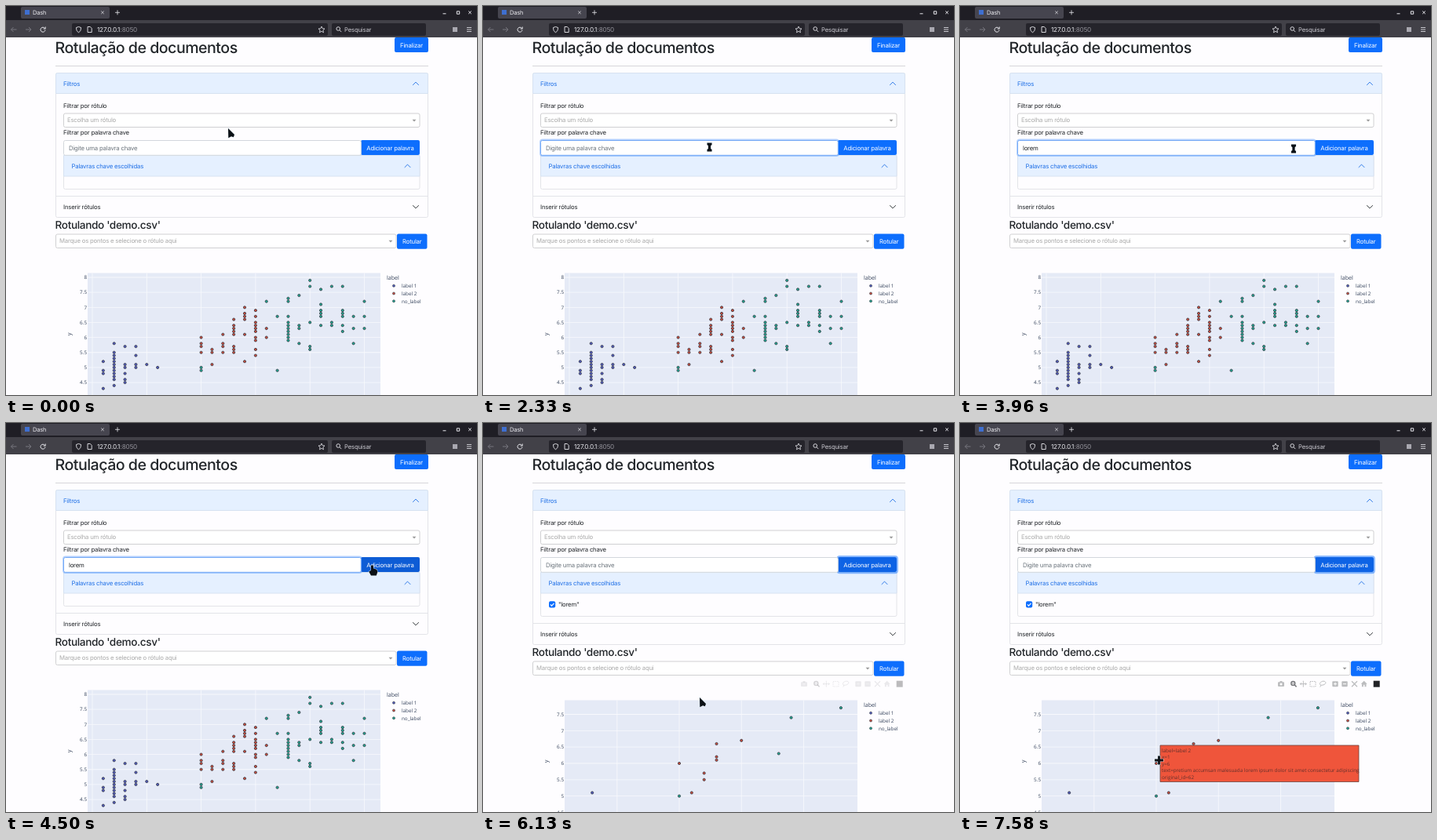
Write an HTML page with a canvas that moves like this. It is 600 px wide and 496 px high and loops after 8 s.

```html
<!DOCTYPE html>
<html lang="pt">
<head>
<meta charset="utf-8">
<title>Rotulação de documentos</title>
<style>
html, body { margin: 0; width: 100%; height: 100%; overflow: hidden; background: #fff; }
canvas { display: block; }
</style>
</head>
<body>
<canvas id="stage" width="600" height="496"></canvas>
<script>
const LOOP = 8000, FOCUS = 1750, PRESS = 4540, RESULT = 4670, HINT = 6960;
const LETTERS = [2580, 2750, 2850, 2960, 3070];
const BLUE = '#0d6efd', INK = '#212529', LINE = '#e3e4e8', PALE = '#e5f0ff';
const ctx = document.getElementById('stage').getContext('2d');

// Scatter values in tenths: {x: [y, ...]} for each label
const span = (a, b) => Array.from({ length: b - a + 1 }, (_, i) => a + i);
const allPoints = [
  { 1: [43, 48, 49, 52], 2: [44, ...span(46, 55), 58], 3: [45, 46, 48, 50, 51, 57],
    4: [50, 51, 54, 57], 5: [51], 6: [50] },
  { 10: [55, 57, 58, 60], 11: [51, 55, 56], 12: [55, 57, 58, 61],
    13: [...span(55, 57), ...span(61, 64), 66], 14: [52, 61, 66, 67, 68, 70],
    15: [54, 56, 59, 60, ...span(62, 65), 67, 69], 16: [60, 63] },
  { 10: [49, 50], 16: [72], 17: [49, 67], 18: [...span(59, 65), 67, 72, 73],
    19: [58, 63, 64, 74], 20: [56, 57, 65, 77, 79], 21: [64, 67, 68, 69, 71, 76],
    22: [64, 65, 77], 23: [62, 64, 67, 68, 69, 77], 24: [58, 63, 67], 25: [63, 67, 72] }
];
const loremPoints = [
  { 3: [51] },
  { 10: [60], 11: [51], 12: [55, 57], 13: [61, 62, 66], 15: [67] },
  { 10: [50], 18: [63], 19: [74], 23: [77] }
];
const views = {
  all: { points: allPoints, x: v => 110 + v * 13.86, y: v => 346 + (80 - v) * 3.83 },
  lorem: { points: loremPoints, x: v => 91.6 + v * 15.84, y: v => 371.5 + (75 - v) * 4.165 }
};
const labels = [['label 1', '#525cc4'], ['label 2', '#cf4c3c'], ['no_label', '#1fab94']];

const clamp = v => Math.max(0, Math.min(1, v));
const ramp = (t, start, length) => clamp((t - start) / length);
const smooth = p => p * p * (3 - 2 * p);

function text(str, x, cy, { size = 7.75, color = INK, weight = 400, font = 'Inter', align = 'left' } = {}) {
  ctx.font = `${weight} ${size}px "${font}", sans-serif`;
  ctx.letterSpacing = font === 'Inter' ? `${-0.026 * size}px` : '0px';
  ctx.textRendering = 'geometricPrecision';
  ctx.textAlign = align;
  ctx.fillStyle = color;
  ctx.fillText(str, x, cy + size * 0.36);
}

function box(x, y, x2, y2, fill, stroke, r = 2, width = 1) {
  ctx.beginPath();
  ctx.roundRect(x, y, x2 - x, y2 - y, r);
  if (fill) { ctx.fillStyle = fill; ctx.fill(); }
  if (stroke) { ctx.strokeStyle = stroke; ctx.lineWidth = width; ctx.stroke(); }
}

function path(d, x, y, color, width = 1, fill) {
  const p = new Path2D(d);
  ctx.save();
  ctx.translate(x, y);
  if (fill) { ctx.fillStyle = fill; ctx.fill(p); }
  if (color) { ctx.strokeStyle = color; ctx.lineWidth = width; ctx.stroke(p); }
  ctx.restore();
}

function circle(x, y, r, fill, stroke, width) {
  ctx.beginPath();
  ctx.arc(x, y, r, 0, 7);
  if (fill) { ctx.fillStyle = fill; ctx.fill(); }
  if (stroke) { ctx.strokeStyle = stroke; ctx.lineWidth = width; ctx.stroke(); }
}

const chevron = (x, y, color, dir) => path(`M-3.8 ${-1.9 * dir}L0 ${1.9 * dir}L3.8 ${-1.9 * dir}`, x, y, color, 0.9);

function browser() {
  const pale = '#e9e9ee', dim = '#77767e', field = '#25242b';
  box(0, 0, 600, 18, '#1f1e25', null, 0);
  box(0, 18, 600, 40, '#424148', null, 0);
  box(19, 1, 132, 16, '#46454f');
  box(24, 5, 30, 11, '#3f6fd0', null, 0);
  text('Dash', 34, 8.3, { color: pale, size: 7.5 });
  path('M-1.8-1.8L1.8 1.8M1.8-1.8L-1.8 1.8', 123, 8.3, pale, 0.7);
  path('M-3 0H3M0-3V3', 142, 8.3, pale, 0.8);
  path('M-2 1.5H2', 558.5, 8.3, pale, 1);
  box(574.3, 6.8, 577.7, 10.2, null, pale, 0, 1);
  path('M-1.8-1.8L1.8 1.8M1.8-1.8L-1.8 1.8', 591, 8.3, pale, 1);
  path('M3.5 0H-3.5M-.5-3L-3.5 0L-.5 3', 10, 30, dim);
  path('M-3.5 0H3.5M.5-3L3.5 0L.5 3', 28.5, 30, dim);
  path('M2.5-1.5A3 3 0 1 0 3 .5M3.2-3.5V-1H.7', 47, 30, pale);
  box(84, 22, 410, 38, field);
  box(415, 22, 535, 38, field);
  path('M0-3.5L3-2.5C3 1 2 2.5 0 3.7C-2 2.5-3 1-3-2.5Z', 92.5, 30, pale, 0.9);
  path('M-2.5-3.5H.8L2.7-1.5V3.5H-2.5Z', 106.5, 30, pale, 0.9);
  text('127.0.0.1', 116, 30, { color: pale, size: 8.2 });
  text(':8050', 145.5, 30, { color: '#929199', size: 8.2 });
  path('M0-4L1.2-1.3L4-1L1.9 .9L2.5 3.8L0 2.3L-2.5 3.8L-1.9 .9L-4-1L-1.2-1.3Z', 402, 30, pale, 0.8);
  circle(423.2, 29, 2.3, null, pale, 0.9);
  path('M0 0L2.3 2.3', 425, 30.8, pale, 0.9);
  text('Pesquisar', 431, 30, { color: '#c9c8cf' });
  box(569, 27, 575, 33, '#a9a8b0', null, 0);
  path('M-3-2.5H3M-3 0H3M-3 2.5H3', 590, 30, pale, 0.8);
}

function select(x, y, x2, placeholder) {
  box(x + 0.5, y + 0.5, x2 - 0.5, y + 18, '#fff', '#d0d0d2');
  text(placeholder, x + 5, y + 9, { color: '#aaa' });
  path('M-2.4-1.2H2.4L0 1.4Z', x2 - 7.5, y + 9.5, null, 1, '#999');
}

function button(label, x, y, x2, y2, color = BLUE) {
  box(x, y, x2, y2, color);
  text(label, (x + x2) / 2, (y + y2) / 2 + 0.3, { color: '#fff', align: 'center' });
}

function keywordRow(t) {
  const hover = ramp(t, 4090, 150) * (1 - ramp(t, 5560, 150) * 0.4);
  const focus = t < PRESS ? ramp(t, FOCUS, 150) : 1 - ramp(t, PRESS, 150);
  const pressed = ramp(t, PRESS, 150);
  if (pressed) box(451.5, 170, 527.8, 191.2, null, `rgba(49,132,253,${0.55 * pressed})`, 3, 2.2);
  button('Adicionar palavra', 452, 171, 527, 190, `rgb(13,${110 - 18 * hover},${253 - 40 * hover})`);
  if (focus) box(73, 170.5, 453, 191, null, `rgba(13,110,253,${0.3 * focus})`, 3, 2);
  box(73.5, 171.5, 452.3, 190.3, '#fff', focus > 0.3 ? '#76aaf5' : '#d3d7dc');
  const typed = t < RESULT ? 'lorem'.slice(0, LETTERS.filter(at => t >= at).length) : '';
  text(typed || 'Digite uma palavra chave', 80, 181, { color: typed ? INK : '#6c757d' });
}

function page(t, shift) {
  box(0, 40, 600, 496, '#fefdff', null, 0);
  text('Rotulação de documentos', 62.5, 53, { size: 19.6, weight: 500 });
  button('Finalizar', 495, 40, 538, 59);
  box(63, 76, 538, 77, '#d6d6d9', null, 0);

  box(63.5, 85.5, 537.5, 269.5 + shift, '#fefdff', LINE);
  box(63.5, 85.5, 537.5, 111.5, PALE, '#d6e2f1', [2, 2, 0, 0]);
  text('Filtros', 73, 99.3, { color: '#1f6fe6' });
  chevron(522, 99, '#1f6fe6', -1);
  text('Filtrar por rótulo', 73, 127);
  select(73, 136.5, 527.5, 'Escolha um rótulo');
  text('Filtrar por palavra chave', 73, 161);

  box(73.5, 190.5, 527, 233.5 + shift, '#fefdff', LINE);
  box(73.5, 190.5, 527, 217, PALE, '#d6e2f1', 0);
  text('Palavras chave escolhidas', 83.5, 204.3, { color: '#1f6fe6' });
  chevron(511.5, 204, '#1f6fe6', -1);
  keywordRow(t);
  if (shift) {
    box(84, 227.3, 92.2, 235.5, BLUE);
    path('M-2.2 0L-.6 1.7L2.4-1.6', 88.1, 231.4, '#fff', 1.2);
    text('"lorem"', 96, 231.5);
  }

  ctx.save();
  ctx.translate(0, shift);
  box(63, 242, 538, 243, LINE, null, 0);
  text('Inserir rótulos', 73, 256.3);
  chevron(522, 256, INK, 1);
  text("Rotulando 'demo.csv'", 62.5, 278.8, { size: 13.6, weight: 500 });
  select(63, 290.5, 497.5, 'Marque os pontos e selecione o rótulo aqui');
  button('Rotular', 498, 290.5, 536.5, 309.7);
  ctx.restore();
}

function chart({ points, x, y }, shift) {
  const plain = { font: 'Open Sans', size: 6.3, color: '#34425a' };
  const top = 340.5 + shift;
  box(104, top, 477, 496, '#e5eaf6', null, 0);
  for (let v = 0; v <= 25; v += 5)
    if (x(v) > 104 && x(v) < 477) box(x(v) - 0.4, top, x(v) + 0.4, 496, '#f8f9fd', null, 0);
  for (let v = 45; v <= 80; v += 5) {
    if (y(v) < top) continue;
    box(104, y(v) - 0.4, 477, y(v) + 0.4, '#f8f9fd', null, 0);
    text(String(v / 10), 103, y(v), { ...plain, align: 'right' });
  }
  ctx.save();
  ctx.translate(80.5, 418.5 + shift);
  ctx.rotate(-Math.PI / 2);
  text('y', 0, 0, { ...plain, size: 7.4, align: 'center' });
  ctx.restore();
  text('label', 485, 346.8 + shift, { ...plain, size: 7.1 });
  labels.forEach(([name, color], i) => {
    const cy = 356.7 + shift + i * 9.8;
    circle(494, cy, 1.5, color, '#3a3f4a', 0.7);
    text(name, 504, cy, plain);
    for (const [px, column] of Object.entries(points[i]))
      for (const py of column) circle(x(+px), y(py), 1.6, color, '#33373f', 0.8);
  });
}

function modebar(opacity) {
  const soft = '#bcbdbf', cy = 332.7;
  ctx.save();
  ctx.globalAlpha = opacity;
  box(405, 330.3, 413, 336, soft, null, 1);
  box(407.5, 329, 410.5, 331, soft, null, 0);
  circle(409, 333, 1.5, '#fff');
  circle(424.3, 332, 2.5, null, '#77787c', 1.4);
  path('M0 0L2.6 2.6', 426, 333.8, '#77787c', 1.5);
  path('M-1.8 0H1.8', 424.3, 332, '#77787c', 0.8);
  path('M-4 0H4M0-4V4M-4 0L-2.5-1.5M-4 0L-2.5 1.5M4 0L2.5-1.5M4 0L2.5 1.5', 437.3, cy, soft);
  ctx.setLineDash([1.5, 1]);
  box(446, 329.5, 453, 336, null, soft, 0);
  ctx.setLineDash([]);
  path('M-2.5 1.5C-6-1 0-5 3-3C5.5-1 2 2-2.5 1.5C-2 3-3 4-3.5 3.5', 462, cy, soft);
  for (const [x, sign] of [[478, 'M-2 0H2M0-2V2'], [490, 'M-2 0H2']]) {
    box(x - 3.7, cy - 3.5, x + 3.7, cy + 3.5, soft, null, 1);
    path(sign, x, cy, '#fff');
  }
  path('M-3.5-3.5L3.5 3.5M3.5-3.5L-3.5 3.5', 502.5, cy, soft, 1.3);
  path('M-4 0L0-4L4 0H2.8V3.5H.8V1H-.8V3.5H-2.8V0Z', 514.7, cy, null, 1, soft);
  box(526.7, 328.7, 534.7, 336.7, '#222326', null, 0);
  ctx.restore();
}

function hint() {
  box(255, 411, 508, 457.5, '#ef553b', '#6b4640', 0, 0.8);
  ['label=label 2', 'x=1', 'y=6',
    'text=pretium accumsan malesuada lorem ipsum dolor sit amet consectetur adipiscing',
    'original_id=62'
  ].forEach((line, i) => text(line, 257, 417.4 + i * 8.5, { font: 'Open Sans', size: 6.3, color: '#63302c' }));
}

// Pointer stops: time, x, y
const stops = [
  [0, 283, 156], [920, 283, 156], [1440, 284.5, 178.5], [1460, 284.5, 178.5], [1580, 288.5, 180],
  [3420, 288.5, 180], [4210, 467, 182.5], [5420, 467, 182.5], [6130, 276, 350], [6210, 276, 350.5],
  [7000, 253.5, 430], [LOOP, 253.5, 430]
];

const shapes = {
  arrow: 'M0 0L8 8L6.8 11.2L4 10.3L.3 12.3Z',
  beam: 'M-3-5.5H3V-3L1.6-2V2L3 3V5.5H-3V3L-1.6 2V-2L-3-3Z',
  hand: 'M-2-1H1V3L5 4.2L6.5 7L4.8 12H-2L-4.8 7L-2 5.5Z',
  cross: 'M-1.4-5.5H1.4V-1.4H5.5V1.4H1.4V5.5H-1.4V1.4H-5.5V-1.4H-1.4Z'
};

function pointer(t, shift) {
  const i = stops.findIndex(s => s[0] > t);
  const [t0, x0, y0] = stops[i - 1], [t1, x1, y1] = stops[i];
  const p = smooth((t - t0) / (t1 - t0));
  const x = x0 + (x1 - x0) * p, y = y0 + (y1 - y0) * p;
  const over = (a, b, c, d) => x >= a && x <= c && y >= b && y <= d;
  let kind = 'arrow';
  if (over(73, 171, 452, 190)) kind = 'beam';
  else if (over(452, 171, 527, 190) || over(73, 190, 527, 217) || over(63, 242 + shift, 538, 269 + shift)) kind = 'hand';
  else if (over(104, 340 + shift, 477, 496)) kind = 'cross';
  path(shapes[kind], x, y, 'rgba(225,240,250,.7)', 1.2);
  path(shapes[kind], x, y, null, 0, '#0c1116');
}

function draw(now) {
  const t = now % LOOP;
  const filtered = t >= RESULT, shift = filtered ? 13 : 0;
  page(t, shift);
  chart(filtered ? views.lorem : views.all, shift);
  modebar(ramp(t, 6040, 300));
  if (t >= HINT) hint();
  browser();
  pointer(t, shift);
  requestAnimationFrame(draw);
}
requestAnimationFrame(draw);
</script>
</body>
</html>
```
